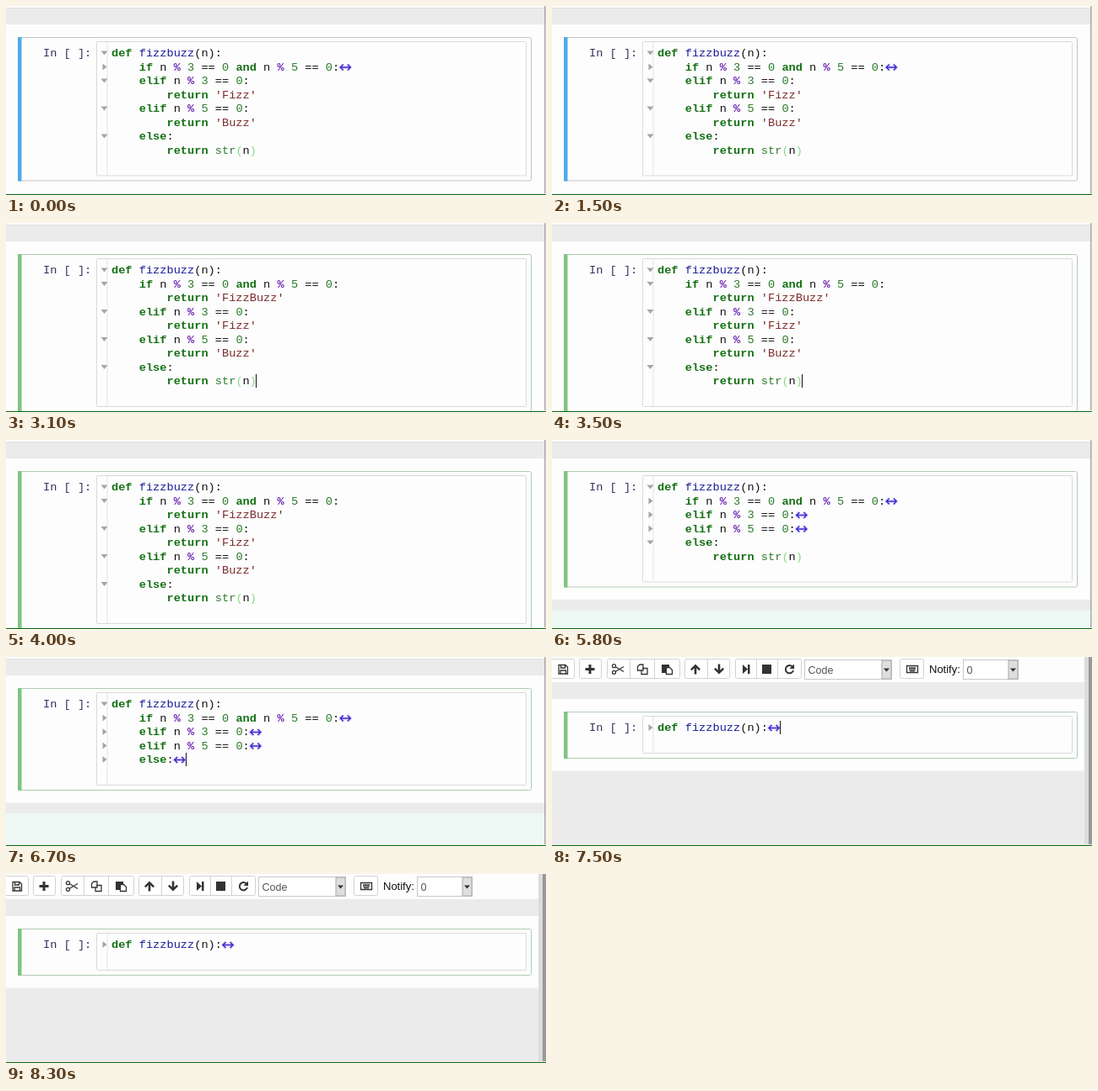
Animation, 640 px wide and 225 px high, one loop 8.4 s. Source, as an HTML page:

```html
<!DOCTYPE html>
<html lang="en">
<head>
<meta charset="utf-8">
<title>Code folding in a notebook cell</title>
<style>
html, body { margin: 0; width: 100%; height: 100%; overflow: hidden; background: #fdfdfd; }
svg { display: block; }
text { white-space: pre; }
.code { font: 13.65px "Liberation Mono", monospace; fill: #111; }
.keyword { font-weight: bold; fill: #147014; }
.name { fill: #1c1c98; }
.number, .builtin { fill: #2a7a2a; }
.string { fill: #7c2a2a; }
.mod { font-weight: bold; fill: #6c22b4; }
.match { fill: #86d886; }
.prompt { fill: #30305f; }
.fold { fill: none; stroke: #3a2ccc; stroke-width: 1.5; }
.glow { fill: none; stroke: #c9b4ff; stroke-width: 4; opacity: .45; }
.ui { font: 13px "Liberation Sans", sans-serif; fill: #111; }
.dim { font-size: 12.5px; fill: #555; }
.button { fill: #fff; stroke: #d2d2d2; }
.icon { fill: #333; }
.line { fill: none; stroke: #333; stroke-width: 1.3; }
</style>
</head>
<body>
<svg id="stage" width="640" height="225" viewBox="0 0 640 225"></svg>
<script>
const LOOP = 8400, CHAR = 8.19, PITCH = 16.5, CODE_X = 125, MARKER = 14.5;
const EDIT_START = 2000, BLINK = 530;

const HEADER = 'def fizzbuzz(n):';
const BRANCHES = [
  ['    if n % 3 == 0 and n % 5 == 0:', "        return 'FizzBuzz'"],
  ['    elif n % 3 == 0:', "        return 'Fizz'"],
  ['    elif n % 5 == 0:', "        return 'Buzz'"],
  ['    else:', '        return str(n)']
];
// [start time, number of folded branches]; 5 folds the whole function
const FOLDS = [[0, 1], [EDIT_START, 0], [4200, 1], [4900, 2], [5700, 3], [6400, 4], [7500, 5]];

const TOKEN = /('\w+')|\b(def|if|elif|else|and|return)\b|\b(fizzbuzz)\b|\b(\d)\b|(%)|str\(n\)/g;
const TOKEN_CLASSES = ['string', 'keyword', 'name', 'number', 'mod'];

const rect = (x, y, w, h, fill, extra = '') =>
  `<rect x="${x}" y="${y}" width="${w}" height="${h}" fill="${fill}" ${extra}/>`;
const path = (d, cls = 'icon') => `<path class="${cls}" d="${d}"/>`;
const label = (x, y, cls, content) => `<text x="${x}" y="${y}" class="${cls}">${content}</text>`;
const span = (cls, content) => `<tspan class="${cls}">${content}</tspan>`;

function highlight(line) {
  return line.replace(TOKEN, (token, ...groups) => {
    const kind = groups.slice(0, 5).findIndex(Boolean);
    if (kind >= 0) return span(TOKEN_CLASSES[kind], token);
    return span('builtin', 'str') + span('match', '(') + 'n' + span('match', ')');
  });
}

function visibleRows(folded) {
  const all = folded === 5;
  const rows = [{ text: HEADER, head: true, closed: all }];
  if (!all) BRANCHES.forEach(([head, body], i) => {
    rows.push({ text: head, head: true, closed: i < folded });
    if (i >= folded) rows.push({ text: body });
  });
  return rows;
}

function foldMarker(x, y) {
  const d = `M${x + 1} ${y}h12M${x + 4.5} ${y - 3.5}l-3.5 3.5 3.5 3.5M${x + 9.5} ${y - 3.5}l3.5 3.5-3.5 3.5`;
  return path(d, 'glow') + path(d, 'fold');
}

function drawRow({ text, head, closed }, y) {
  let out = label(CODE_X, y + 4.3, 'code', highlight(text));
  if (closed) out += foldMarker(CODE_X + text.length * CHAR, y + .5);
  if (head) {
    const d = closed ? `M114.5 ${y - 4}l5 4-5 4z` : `M112.5 ${y - 2.5}h8l-4 5z`;
    out += `<path d="${d}" fill="#a5a5a5"/>`;
  }
  return out;
}

function drawToolbar() {
  const groups = [[-2, 28], [32, 26], [65, 86], [157, 53], [217, 78], [412, 28]];
  const dividers = [92, 121, 184, 242, 267];
  let out = rect(0, 0, 640, 30, '#fdfdfd');
  groups.forEach(([x, w]) => out += `<rect class="button" x="${x + .5}" y="2.5" width="${w}" height="23" rx="2"/>`);
  dividers.forEach(x => out += path(`M${x + .5} 3v22`, 'button'));

  out += path('M8 9.5h8l2.5 2.5v8H8zM10.5 9.5v3.5h5v-3.5M10 20v-4h6.5v4', 'line');
  out += path('M43.5 9h3v4h4v3h-4v4h-3v-4h-4v-3h4z');
  out += path('M75 11.5l10 6M75 17.5l10-6', 'line') +
    '<circle class="line" cx="73.5" cy="10.7" r="2"/><circle class="line" cx="73.5" cy="18.3" r="2"/>';
  out += path('M101.5 11.5l2.5-2.5h4v7h-6.5zM107 13.5h6v7h-7v-4.5', 'line');
  out += path('M130 9h9v3h-4v7h-5z') + path('M135.5 12.5h4l3 3v5h-7z', 'line');
  out += path('M170 8.5l6 6-1.7 1.7-3-3v7.3h-2.6v-7.3l-3 3L164 14.5z');
  out += path('M198 20.5l6-6-1.7-1.7-3 3V8.5h-2.6v7.3l-3-3-1.7 1.7z');
  out += path('M226 9l6 5.5-6 5.5zM232 9h2.5v11H232z') + rect(249, 9, 11, 11, '#333');
  out += '<path class="line" style="stroke-width:2" d="M285 11.5a4.7 4.7 0 1 0 1 4.5"/>' + path('M287 8.5v5.5h-5.5z');
  out += path('M420.5 10.5h13v8h-13zM423 13h8M423 14.8h8M424 16.7h6', 'line');

  [[299, 104, 'Code'], [487, 66, '0']].forEach(([x, w, value]) => {
    out += rect(x + .5, 3.5, w - 1, 23, '#fff', 'stroke="#c8c8c8"') +
      rect(x + w - 12, 4, 11, 22, '#dedede', 'stroke="#aaa"') +
      path(`M${x + w - 10} 13.5h7l-3.5 4z`) +
      label(x + 4.5, 20, 'ui dim', value);
  });
  return out + label(447, 19, 'ui', 'Notify:');
}

function drawScene(folded, editing, cursor) {
  const scrolled = folded === 5;
  const rows = visibleRows(folded);
  const shift = scrolled ? 28 : 0;
  const top = 37 + shift;
  const extra = (rows.length - 1) * PITCH;
  const bottom = top + 56 + extra;
  const accent = editing ? '#7fc583' : '#50a9ea';
  const rowY = i => top + 19 + i * PITCH;

  let out = rect(0, 0, 640, 225, '#ebebeb');
  out += scrolled ? drawToolbar() : rect(0, 0, 640, 2, '#fdfdfd') + rect(0, 2, 640, 1, '#e0e0e0');
  out += rect(0, 22 + shift, 640, bottom + 14.5 - 22 - shift, '#fdfdfd');
  if (!scrolled) out += rect(0, bottom + 27, 640, 225, '#eef8f4');

  out += rect(14.5, top + .5, 608, 55 + extra, '#fdfdfd', `rx="2" stroke="${editing ? '#b0ccb2' : '#c3c3c3'}"`);
  out += rect(14, top, 4.5, 56 + extra, accent);
  out += rect(107.5, top + 5.5, 509, 44 + extra, '#fdfdfd', 'rx="1" stroke="#d8dbd8"');
  out += rect(119.5, top + 6, 1, 43 + extra, '#dfe8e2');
  out += label(44, top + 23.3, 'code', span('prompt', 'In [ ]:'));
  rows.forEach((row, i) => out += drawRow(row, rowY(i)));

  if (cursor) {
    const last = rows[rows.length - 1];
    const x = CODE_X + last.text.length * CHAR + (last.closed ? MARKER : 0);
    out += rect(Math.floor(x), rowY(rows.length - 1) - 8, 1, 16, '#111');
  }

  out += scrolled
    ? rect(631, 0, 5, 223, '#dcdcdc') + rect(636, 0, 4, 223, '#999')
    : rect(638, 0, 1.5, 223, '#aaa');
  return out + rect(0, 224, 640, 1, '#0b6414');
}

const stage = document.getElementById('stage');
let shown = '';

function tick() {
  const t = performance.now() % LOOP;
  const folded = FOLDS.filter(([start]) => t >= start).pop()[1];
  const editing = t >= EDIT_START;
  const cursor = editing && (t - EDIT_START) % (2 * BLINK) < BLINK;
  const key = [folded, editing, cursor].join();
  if (key !== shown) {
    stage.innerHTML = drawScene(folded, editing, cursor);
    shown = key;
  }
  requestAnimationFrame(tick);
}
tick();
</script>
</body>
</html>
```
